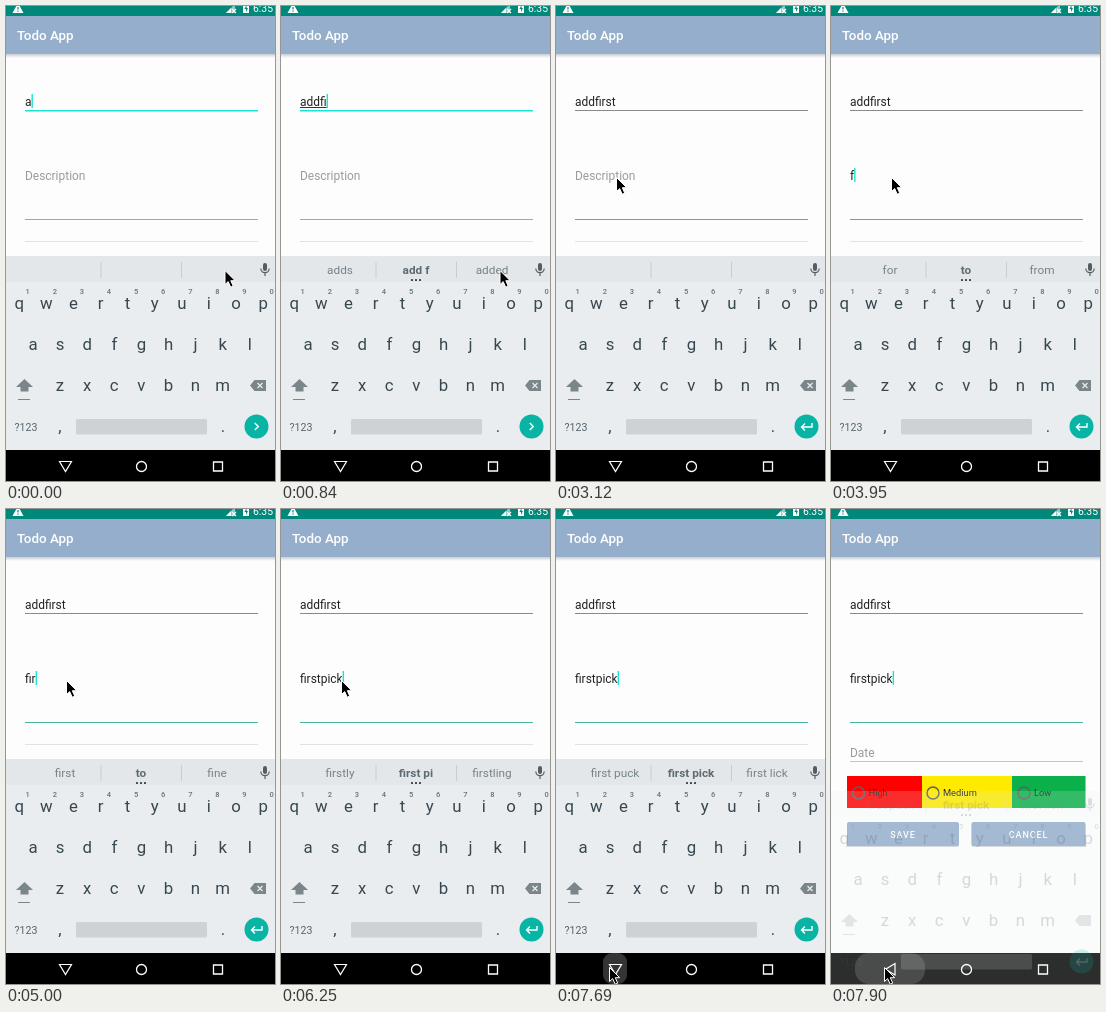
Animation, 269 px wide and 475 px high, one loop 8 s. Source, as an HTML page with a canvas:

```html
<!DOCTYPE html>
<html lang="en">
<head>
<meta charset="utf-8">
<title>Todo App</title>
<style>
html, body { margin: 0; width: 100%; height: 100%; overflow: hidden; background: #fdfdfd; }
canvas { display: block; width: 269px; height: 475px; }
</style>
</head>
<body>
<canvas id="stage"></canvas>
<script>
const W = 269, H = 475, LOOP = 8000, TICK = 208, BLINK = 2.7;
const canvas = document.getElementById('stage');
const ctx = canvas.getContext('2d');
const dpr = window.devicePixelRatio || 1;
canvas.width = W * dpr;
canvas.height = H * dpr;

const BLUE = '#94aecb', TEAL = '#08b5a4', CARET = '#1be3d3', INK = '#37474f', KEY_GREY = '#7b868b';

// Each list holds [tick, value] entries; a value lasts until the next entry.
const titleText = [...'addfirst'].map((_, i) => [i, 'addfirst'.slice(0, i + 1)]);
const descriptionText = [
  [12.2, ''], [18, 'f'], [21, 'fi'], [24, 'fir'], [25, 'firs'], [26, 'first'],
  [28, 'firstp'], [29, 'firstpi'], [30, 'firstpick']
];
const suggestions = [
  [0, ''], [1, 'as,a,at'], [2, 'and,ad,as'], [3, 'and,add,added'], [4, 'adds,add f,added'],
  [5, 'adds,add fi,added'], [6, 'as fir,add fir,ad fire'], [7, 'as first,add fire,ad fires'],
  [8, 'as driest,add first,ad driest'], [13, ''], [19, 'for,to,from'], [21, 'first,to,fine'],
  [25, 'first,fir,fire'], [26, 'first,firs,firstly'], [28, 'firstly,first,firsts'],
  [29, 'firstly,first p,firsts'], [30, 'firstly,first pi,firstling'],
  [31, 'first puck,first pick,first lick']
];
const mousePath = [
  [0, 218.5, 264], [6, 218.5, 264], [8, 129, 303], [9, 129, 303], [12, 60, 171],
  [30, 60, 171], [33, 16, 389], [36, 53, 458], [39, 53, 458]
];

const current = (list, n) => list.filter(([tick]) => tick <= n).pop();

function mouseAt(n) {
  const i = mousePath.findIndex(([tick]) => tick > n);
  const [t0, x0, y0] = mousePath[i - 1], [t1, x1, y1] = mousePath[i];
  const k = (n - t0) / (t1 - t0);
  return [x0 + (x1 - x0) * k, y0 + (y1 - y0) * k];
}

function rect(x, y, w, h, color, radius = 0) {
  ctx.fillStyle = color;
  ctx.beginPath();
  ctx.roundRect(x, y, w, h, radius);
  ctx.fill();
}

function text(str, x, y, size, color, { weight = 400, align = 'left', spacing = 0 } = {}) {
  ctx.font = `${weight} ${size}px Roboto, sans-serif`;
  ctx.textAlign = align;
  ctx.letterSpacing = spacing + 'px';
  ctx.fillStyle = color;
  ctx.fillText(str, x, y);
  return ctx.measureText(str).width;
}

function path(d, fill, stroke, width = 1) {
  const shape = new Path2D(d);
  if (fill) { ctx.fillStyle = fill; ctx.fill(shape); }
  if (stroke) { ctx.strokeStyle = stroke; ctx.lineWidth = width; ctx.stroke(shape); }
}

function circle(x, y, r, fill, stroke, width = 1) {
  path(`M${x - r} ${y}a${r} ${r} 0 1 0 ${2 * r} 0a${r} ${r} 0 1 0 ${-2 * r} 0z`, fill, stroke, width);
}

function drawHeader() {
  const shadow = ctx.createLinearGradient(0, 48, 0, 52);
  shadow.addColorStop(0, '#c9cdd2');
  shadow.addColorStop(1, '#fdfdfd');
  rect(0, 48, W, 4, shadow);
  rect(0, 0, W, 10, '#00897b');
  rect(0, 10, W, 38, BLUE);
  path('M12-3L17.5 7H6.5z', '#fff');
  rect(11.4, 1, 1.2, 2.5, '#00897b');
  rect(11.4, 4.5, 1.2, 1.2, '#00897b');
  path('M220 7L229-2V7z', '#8cc9c2');
  path('M220 7L225 2V7z', '#fff');
  path('M226 3l4 4m0-4l-4 4', null, '#fff', 1.2);
  rect(237, -2, 6, 9, '#fff', 0.5);
  path('M240.6-1L238.4 3H240v3L242 2h-1.4z', '#00897b');
  text('6:35', 247, 6, 10.4, '#fff');
  text('Todo App', 11, 34, 13.4, '#fff', { weight: 500 });
}

function drawField(entry, n, { y, hint, focused, underlined }) {
  const [editedAt, value] = entry;
  const width = text(value, 19, y, 11.95, '#222');
  if (!value) text(hint, 19, y, 11.95, '#9b9b9b');
  if (underlined) rect(19, y + 1, width, 1, '#333');
  const caretOn = Math.floor((n - editedAt) / BLINK) % 2 === 0;
  if (focused && caretOn) rect(19 + width, y - 12, 1.4, 14, CARET);
}

function drawForm(n, keyboardOpen) {
  const inTitle = n < 13;
  drawField(current(titleText, n), n, { y: 100, focused: inTitle, underlined: inTitle && n > 0 });
  rect(19, 104, 233, inTitle ? 1.6 : 1, inTitle ? CARET : '#8a8a8a');
  drawField(inTitle ? [0, ''] : current(descriptionText, n), n,
    { y: 174, hint: 'Description', focused: !inTitle });
  rect(19, 213, 233, 1, inTitle ? '#a5a5a5' : '#4bb3a3');
  if (keyboardOpen) rect(19, 235, 233, 1, '#e2e2e2');
  else drawLowerForm();
}

function drawLowerForm() {
  text('Date', 19, 248, 11.95, '#9b9b9b');
  rect(19, 252, 233, 1, '#c4c4c4');
  const options = [['High', 16, 75, '#ff0000', 27.5], ['Medium', 91, 90, '#ffea00', 102], ['Low', 181, 73.5, '#0bb04a', 193]];
  for (const [label, x, w, color, radioX] of options) {
    rect(x, 267, w, 32, color);
    circle(radioX, 284, 6, null, '#5f5f5f', 1.5);
    text(label, radioX + 10, 287, 9.3, '#222');
  }
  for (const [label, x, w] of [['SAVE', 16, 112], ['CANCEL', 140.5, 114]]) {
    rect(x, 314, w, 24, '#d0d5da', 2);
    rect(x, 313, w, 24, BLUE, 2);
    text(label, x + w / 2, 328.5, 9, '#fff', { weight: 500, align: 'center', spacing: 0.9 });
  }
}

function drawSuggestions(n) {
  rect(0, 250, W, 26, '#e3e7ea');
  rect(94.5, 256, 1, 16, '#c7cdd0');
  rect(175, 256, 1, 16, '#c7cdd0');
  const words = current(suggestions, n)[1];
  if (words) {
    words.split(',').forEach((word, i) => text(word, 59 + 76 * i, 268, 11.8,
      i === 1 ? '#5d6b72' : '#76838a', { weight: i === 1 ? 700 : 400, align: 'center' }));
    for (const x of [131, 135, 139]) rect(x - 1, 273, 2, 2, INK, 0.5);
  }
  rect(257, 257, 4, 8, '#535e64', 2);
  path('M254.8 262.5a4.2 4.2 0 0 0 8.4 0M259 266.7V270', null, '#535e64', 1.2);
}

function drawKeyboard(n) {
  drawSuggestions(n);
  rect(0, 276, W, 168, '#e9edf0');
  const rows = [['qwertyuiop', 13.2, 303], ['asdfghjkl', 27, 344], ['zxcvbnm', 54, 385]];
  rows.forEach(([letters, x0, y], row) => [...letters].forEach((letter, i) => {
    const x = x0 + 27.1 * i;
    text(letter, x, y, 16.8, INK, { align: 'center' });
    if (row === 0) text((i + 1) % 10, x + 8.5, 288, 7.5, '#66737a', { weight: 500, align: 'center' });
  }));
  path('M18.5 373L27 381H22.5V385.5H14.5V381H10z', KEY_GREY);
  rect(12, 393, 12, 1, KEY_GREY);
  path('M244 379.5L248.5 374H260V385H248.5z', KEY_GREY);
  path('M251.5 377l5 5m0-5l-5 5', null, '#e9edf0', 1.2);
  text('?123', 8.5, 424.5, 10.6, '#56646b');
  text(',', 54, 426, 16.8, INK, { align: 'center' });
  text('.', 217, 426, 16.8, INK, { align: 'center' });
  rect(70, 413, 131, 15.5, '#cdd2d5', 1.5);
  circle(250.5, 420.5, 12, TEAL);
  path(n < 13 ? 'M248.8 417l3.5 3.5l-3.5 3.5' : 'M256 417v4H245.5M249 417.5l-3.5 3.5l3.5 3.5', null, '#fff', 1.4);
}

function drawNavIcons(n) {
  if (n === 37) rect(47, 444, 24, 31, '#343434', 9);
  if (n === 38) rect(24, 444, 70, 31, 'rgba(255,255,255,.14)', 14);
  path(n < 38 ? 'M53.5 455.5H65.5L59.5 465.5z' : 'M64 454.5V466L54.5 460.2z', null, '#fff', 1.2);
  circle(135.5, 460.5, 5, null, '#fff', 1.3);
  path('M207.5 456h9v9h-9z', null, '#fff', 1.3);
}

function drawMouse(n) {
  ctx.save();
  ctx.translate(...mouseAt(n));
  ctx.lineJoin = 'round';
  path('M.5.5V14.5L3.7 11.6L6.2 17.2L8.7 16.1L6.3 10.7H10.7z', '#000', '#fff', 1);
  ctx.restore();
}

function draw(time) {
  const n = Math.floor((time % LOOP + 8) / TICK);
  const keyboardOpen = n < 38;
  ctx.setTransform(dpr, 0, 0, dpr, 0, 0);
  rect(0, 0, W, H, '#fdfdfd');
  drawHeader();
  drawForm(n, keyboardOpen);
  rect(0, 444, W, 31, '#000');
  ctx.save();
  if (!keyboardOpen) {
    ctx.globalAlpha = 0.19;
    ctx.translate(0, 32);
  }
  drawKeyboard(n);
  ctx.restore();
  drawNavIcons(n);
  drawMouse(n);
}

const start = performance.now();
function frame() {
  draw(performance.now() - start);
  requestAnimationFrame(frame);
}
frame();
</script>
</body>
</html>
```
